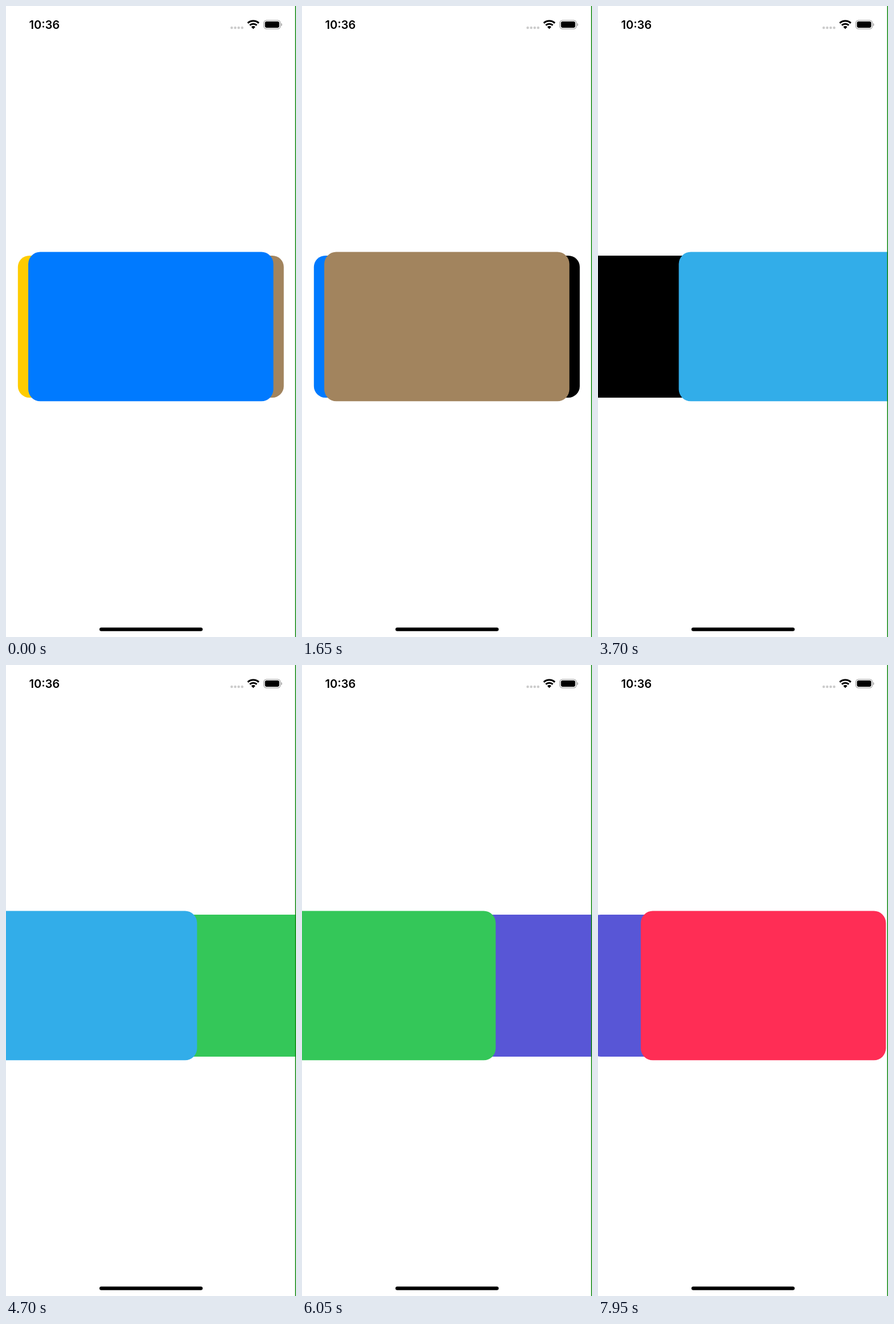
An HTML page with a canvas for the animation above (8000 ms loop, 508 by 1102 pixels).

```html
<!DOCTYPE html>
<html lang="en">
<head>
<meta charset="utf-8">
<title>Stacked cards</title>
<style>
  html, body { margin: 0; width: 100%; height: 100%; overflow: hidden; background: #fff; }
  canvas { display: block; position: absolute; left: 0; top: 0; }
  #clock {
    position: absolute; left: 40.5px; top: 20px; line-height: 26px;
    font: 600 20px/26px Inter, "Liberation Sans", sans-serif; color: #000;
  }
</style>
</head>
<body>
<canvas id="stage" width="508" height="1102"></canvas>
<div id="clock">10:36</div>
<script>
const ctx = document.getElementById('stage').getContext('2d');
const LOOP = 8000, STEP = 50;
const CARD = { x: 253.7, y: 559.9, w: 429.4, h: 260.8, r: 21 };
const SIDE = 28.7, SHRINK = 0.951, REACH = 205;

const COLORS = ['#ffcc00', '#007aff', '#a2845e', '#000000', '#32ade9',
                '#34c759', '#5856d6', '#ff2d55', '#af52de'];

// Each swipe: finger down, release, cards at rest
const SWIPES = [
  [1030, 1270, 1650], [2080, 2350, 2750], [3230, 3500, 3900],
  [4530, 4814, 5250], [5830, 6207, 6600], [7330, 7660, 8060]
];

const ease = u => (1 - Math.cos(Math.PI * u)) / 2;

function pose(t) {
  let front = 1, spread = 0, settling = false;
  for (const [down, release, rest] of SWIPES) {
    if (t >= release) front++;
    if (t > down && t < release) {
      spread = REACH * ease((t - down) / (release - down));
    } else if (t >= release && t < rest) {
      spread = REACH * (1 - ease((t - release) / (rest - release)));
      settling = true;
    }
  }
  return { front, spread, settling };
}

function pill(x, y, w, h, r, color) {
  ctx.fillStyle = color;
  ctx.beginPath();
  ctx.roundRect(x, y, w, h, r);
  ctx.fill();
}

function card(index, dx, scale) {
  const w = CARD.w * scale, h = CARD.h * scale;
  pill(CARD.x + dx - w / 2, CARD.y - h / 2, w, h, CARD.r * scale, COLORS[index]);
}

function drawCards({ front, spread, settling }) {
  if (settling) {
    card(front + 1, SIDE, SHRINK);
    card(front - 1, -SIDE - spread, SHRINK);
    card(front, spread, 1);
  } else {
    card(front - 1, -SIDE, SHRINK);
    card(front + 1, SIDE + spread, SHRINK);
    card(front, -spread, 1);
  }
}

function drawWifi(x, y) {
  const mid = -Math.PI / 2, half = 0.75;
  ctx.strokeStyle = ctx.fillStyle = '#000';
  ctx.lineWidth = 3;
  for (const r of [14.2, 9]) {
    ctx.beginPath();
    ctx.arc(x, y, r, mid - half, mid + half);
    ctx.stroke();
  }
  ctx.beginPath();
  ctx.moveTo(x, y);
  ctx.arc(x, y, 5.2, mid - half, mid + half);
  ctx.fill();
}

function drawBattery() {
  ctx.strokeStyle = '#a3a3a3';
  ctx.lineWidth = 1.3;
  ctx.beginPath();
  ctx.roundRect(451.6, 25.1, 29, 14.8, 4.6);
  ctx.stroke();
  pill(453.6, 27.1, 25, 10.8, 2.8, '#000');
  pill(481.9, 30.1, 1.6, 4.8, [0, 1.6, 1.6, 0], '#a3a3a3');
}

function drawChrome() {
  for (let i = 0; i < 4; i++) pill(393.2 + i * 6.1, 35.8, 4.4, 4.4, 2.2, '#cbcbcb');
  drawWifi(433.2, 40.2);
  drawBattery();
  pill(163.7, 1085.4, 180.8, 6.4, 3.2, '#000');
  ctx.fillStyle = '#128a12';
  ctx.fillRect(506.5, 0, 1.5, 1102);
}

function draw(now) {
  const t = Math.floor((now % LOOP) / STEP) * STEP;
  ctx.fillStyle = '#fff';
  ctx.fillRect(0, 0, 508, 1102);
  drawCards(pose(t));
  drawChrome();
}

const begin = performance.now();
function tick() {
  draw(performance.now() - begin);
  requestAnimationFrame(tick);
}
tick();
</script>
</body>
</html>
```
